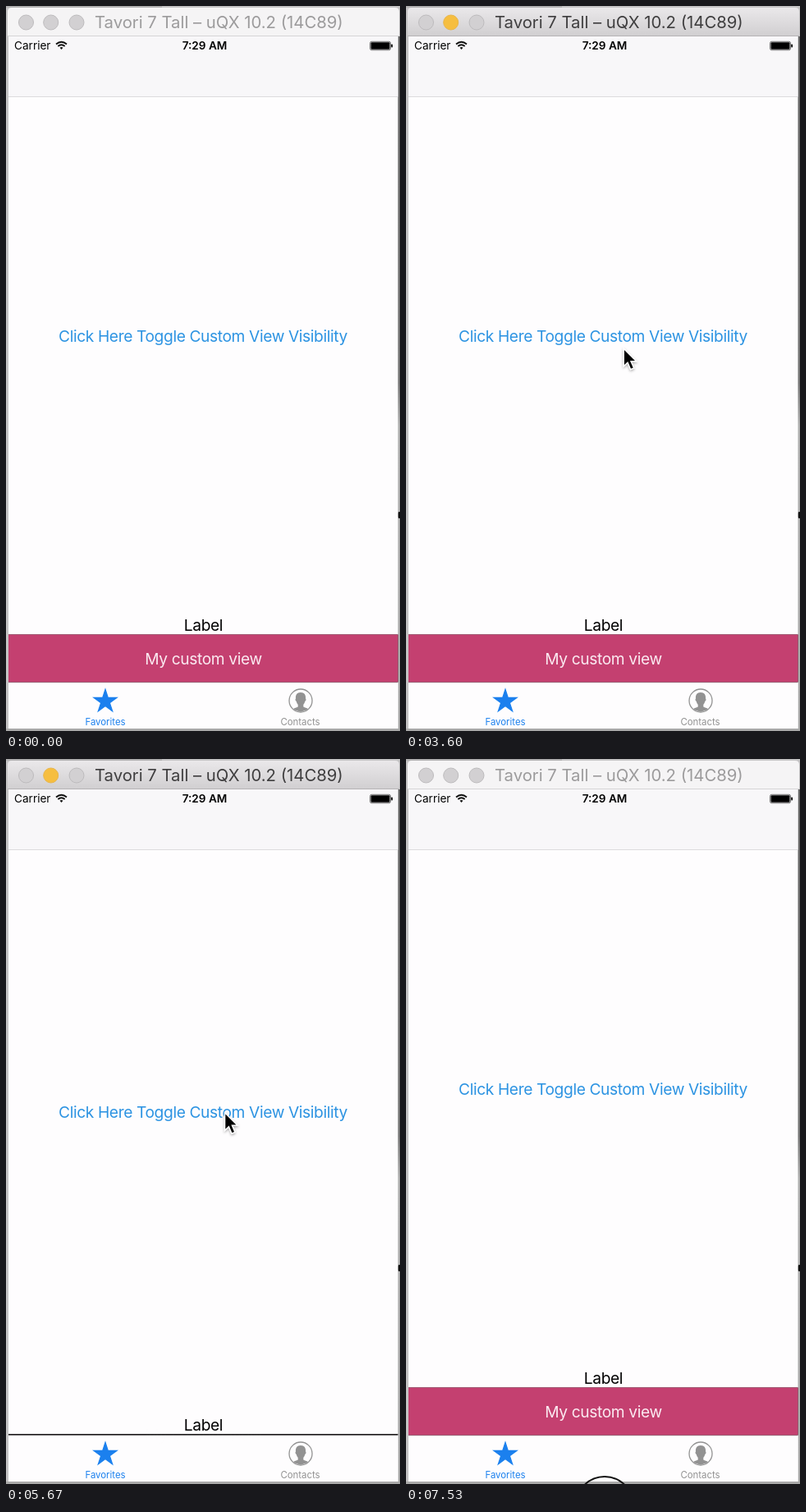
Animation, 480 px wide and 883 px high, one loop 7590 ms. Source, as an HTML page:

```html
<!DOCTYPE html>
<html>
<head>
<meta charset="utf-8">
<style>
  html, body { margin: 0; width: 100%; height: 100%; overflow: hidden; background: #c4c3c4; }
  svg { display: block; width: 480px; height: 883px; font-family: Inter, Roboto, sans-serif; }
  .big { font-size: 19.2px; letter-spacing: -.02em; text-anchor: middle; }
  .tab { font-size: 11.4px; text-anchor: middle; }
  .status { font-size: 13.6px; }
</style>
</head>
<body>
<svg viewBox="0 0 480 883">
  <defs>
    <linearGradient id="chrome" x2="0" y2="1">
      <stop stop-color="#eae8ea"/><stop offset="1" stop-color="#d1cfd1"/>
    </linearGradient>
    <linearGradient id="edge" x2="0" y2="1">
      <stop stop-color="#666"/><stop offset=".5" stop-color="#777"/>
      <stop offset=".56" stop-color="#b0b0b0"/><stop offset="1" stop-color="#aaa"/>
    </linearGradient>
    <filter id="soft" x="-50%" y="-50%" width="200%" height="200%">
      <feDropShadow dx="0" dy="1.5" stdDeviation="1.5" flood-opacity=".35"/>
    </filter>
  </defs>

  <!-- Desktop edges and window -->
  <rect width="480" height="883" fill="#c4c3c4"/>
  <rect width="190" height="2" fill="#b0afb0"/>
  <rect x="477" y="37" width="3" height="846" fill="url(#edge)"/>
  <rect x="477.500" y="616" width="3" height="8" rx="2" fill="#111"/>
  <rect y="880" width="480" height="3" fill="#a9a9a9"/>
  <path id="bar" d="M2 36V7q0-5 5-5H474q5 0 5 5V36z"/>
  <rect id="barLine" x="2" y="36" width="477" height="1"/>
  <g stroke="#bdbbbd">
    <circle cx="24.500" cy="20" r="9" fill="#d2d0d2"/>
    <circle id="yellow" cx="54.700" cy="20" r="9"/>
    <circle cx="86" cy="20" r="9" fill="#d2d0d2"/>
  </g>
  <text id="title" x="108" y="27" font-size="20.3">Tavori 7 Tall – uQX 10.2 (14C89)</text>

  <!-- Screen -->
  <rect x="3" y="37" width="474.500" height="843" fill="#fefdfe"/>
  <rect x="3" y="37" width="474.500" height="73" fill="#f8f7f9"/>
  <rect x="3" y="110" width="474.500" height="1" fill="#dcdbdd"/>
  <text class="status" x="10" y="53">Carrier</text>
  <g fill="none" stroke="#111" stroke-width="1.800">
    <path d="M61 46.500q6.500-5.500 13 0M63.300 49q4.200-3.500 8.400 0"/>
    <path d="M67.500 53l-2-2.300q2-1.500 4 0z" fill="#111" stroke="none"/>
  </g>
  <text class="status" x="242" y="53" font-weight="600" text-anchor="middle">7:29 AM</text>
  <rect x="443.500" y="43.300" width="25" height="10.400" rx="2" fill="none" stroke="#111" stroke-width=".6"/>
  <rect x="444.500" y="44.300" width="23" height="8.400" rx="1"/>
  <rect x="469.300" y="46.500" width="1.700" height="4" rx=".8"/>

  <g id="favorites">
    <text id="button" class="big" x="240" fill="#2c93e2">Click Here Toggle Custom View Visibility</text>
    <text id="label" class="big" x="240.500">Label</text>
  </g>

  <!-- Tab bar -->
  <rect x="3" y="824" width="474.500" height="56" fill="#fefdfe"/>
  <rect x="3" y="823.500" width="474.500" height="1" fill="#dddcde"/>
  <path id="star" stroke-width="1.200"/>
  <text id="starText" class="tab" x="121" y="876">Favorites</text>
  <circle id="disc" cx="359" cy="846" r="14" stroke-width="1.300"/>
  <path id="head" d="M359 836c4.500 0 6.500 3 6 7.500 1 .5.500 3-.8 3.500-.3 2-1.200 3-1.900 3.800v2.700c2 1.200 4 1.500 5.700 2.500-5 4.200-13 4.200-18 0 1.700-1 3.700-1.300 5.700-2.500v-2.700c-.7-.8-1.600-1.800-1.900-3.800-1.300-.5-1.800-3-.8-3.500-.5-4.500 1.500-7.500 6-7.500z"/>
  <text id="discText" class="tab" x="358.500" y="876">Contacts</text>

  <rect id="backing" x="3" width="474.500"/>
  <g id="custom">
    <rect id="strip" x="3" width="474.500" fill="#c44070"/>
    <text id="caption" class="big" x="240.500" fill="#fbeaf1">My custom view</text>
  </g>

  <circle id="ring" r="35" fill="none" stroke="#111" stroke-width="2"/>
  <path id="cursor" d="M0 0V21.500L4.800 17 8.400 25.300 12.300 23.600 8.800 15.500H15.500z" stroke="#fff" stroke-width="1.400" filter="url(#soft)"/>
</svg>
<script>
const LOOP = 7590, BLUE = '#1b80ee', GRAY = '#929292', WHITE = '#fefdfe';
const $ = id => document.getElementById(id);
const set = (id, attrs) => {
  for (const key in attrs) $(id).setAttribute(key, attrs[key]);
};
const clamp = x => Math.max(0, Math.min(1, x));
const ease = x => x * x * (3 - 2 * x);
const ramp = (t, start, length) => ease(clamp((t - start) / length));

// Pointer stops: time, x, y
const stops = [
  [100, 338, 912], [650, 350, 853], [1500, 350, 853], [2130, 120, 847],
  [2850, 120, 847], [3680, 269, 406], [4560, 269, 406], [4900, 266, 432],
  [5500, 266, 432], [5800, 267, 430], [6300, 267, 430], [6730, 242, 912]
];
const clicks = [[870, 1000], [2200, 2330], [4060, 4190], [5510, 5640], [7480, LOOP]];

function pointer(t) {
  let [, x, y] = stops[0];
  for (let i = 1; i < stops.length; i++) {
    const [t0, x0, y0] = stops[i - 1], [t1, x1, y1] = stops[i];
    if (t < t0) break;
    const k = ramp(t, t0, t1 - t0);
    x = x0 + (x1 - x0) * k;
    y = y0 + (y1 - y0) * k;
  }
  return [x, y];
}

const starPoints = Array.from({ length: 10 }, (_, i) => {
  const r = i % 2 ? 5.6 : 14.8, a = i * Math.PI / 5;
  return `${121 + r * Math.sin(a)} ${847 - r * Math.cos(a)}`;
});
set('star', { d: `M${starPoints.join('L')}z` });

function draw(t) {
  const active = t >= 870 && t < 7470;
  set('bar', { fill: active ? 'url(#chrome)' : '#f5f4f5' });
  set('barLine', { fill: active ? '#b5b3b5' : '#d6d5d6' });
  set('yellow', { fill: active ? '#f6be40' : '#d2d0d2', stroke: active ? '#e8b54a' : '#bdbbbd' });
  set('title', { fill: active ? '#3f3e3f' : '#9c9b9c' });

  const contacts = t >= 1000 && t < 2330;
  const left = contacts ? GRAY : BLUE, right = contacts ? BLUE : GRAY;
  set('favorites', { visibility: contacts ? 'hidden' : 'visible' });
  set('star', { fill: contacts ? WHITE : BLUE, stroke: left });
  set('starText', { fill: left });
  set('disc', { fill: contacts ? BLUE : WHITE, stroke: right });
  set('head', { fill: contacts ? WHITE : GRAY });
  set('discText', { fill: right });

  // The strip collapses and fades over black
  const hidden = ramp(t, 4197, 300) - ramp(t, 5643, 300);
  const box = { y: 765.5 + 58 * hidden, height: 58 * (1 - hidden) };
  set('backing', box);
  set('strip', box);
  set('custom', { opacity: 1 - hidden });
  set('caption', { y: 802 + 29 * hidden, visibility: hidden < 1 ? 'visible' : 'hidden' });
  set('button', { y: 408.5 + 29 * hidden });
  set('label', { y: 761 + 58 * hidden });

  const [x, y] = pointer(t);
  const pressed = clicks.some(([from, to]) => t >= from && t < to);
  set('cursor', { transform: `translate(${x} ${y})` });
  set('ring', { cx: x, cy: y - 3, visibility: pressed ? 'visible' : 'hidden' });
}

const start = performance.now();
function tick() {
  draw((performance.now() - start) % LOOP);
  requestAnimationFrame(tick);
}
tick();
</script>
</body>
</html>
```
